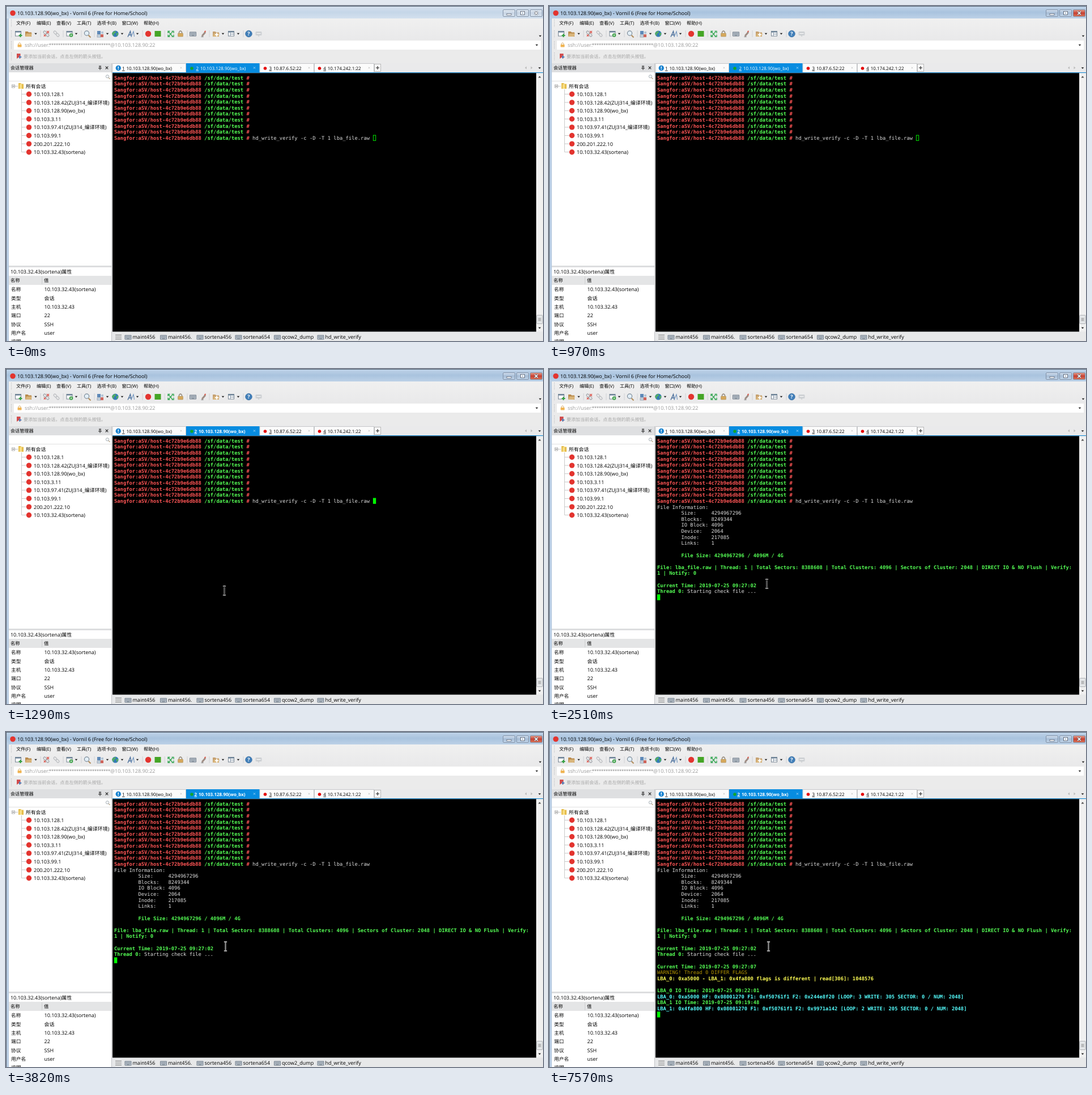
Animation of 948x591 px, one loop 8000 ms. Source, as an HTML page:

```html
<!DOCTYPE html>
<html lang="zh-CN">
<head>
<meta charset="utf-8">
<title>Terminal session</title>
<style>
html, body { margin: 0; width: 100%; height: 100%; overflow: hidden; background: #000; }
svg { display: block; width: 948px; height: 591px; }
text { font-family: 'Open Sans', 'Noto Sans CJK SC', 'Noto Sans CJK', sans-serif; white-space: pre; text-rendering: geometricPrecision; }
.term text { font: 8.824px 'DejaVu Sans Mono', monospace; }
.term .b { font-weight: bold; }
</style>
</head>
<body>
<svg id="stage" viewBox="0 0 948 591" xmlns="http://www.w3.org/2000/svg"></svg>
<script>
const rect = (x, y, w, h, fill, more = '') => `<rect x="${x}" y="${y}" width="${w}" height="${h}" fill="${fill}" ${more}/>`;
const circle = (x, y, r, fill, more = '') => `<circle cx="${x}" cy="${y}" r="${r}" fill="${fill}" ${more}/>`;
const line = (d, stroke, width = 1, more = '') => `<path d="${d}" fill="none" stroke="${stroke}" stroke-width="${width}" ${more}/>`;
const shape = (d, fill, more = '') => `<path d="${d}" fill="${fill}" ${more}/>`;
const label = (x, y, s, size = 9, fill = '#000', more = '') => `<text x="${x}" y="${y}" font-size="${size}" fill="${fill}" ${more}>${s}</text>`;
const group = (id, body, more = '') => `<g id="${id}" ${more}>${body}</g>`;
const caret = (x, y, fill = '#222') => shape(`M${x - 2.3} ${y - 1.2}h4.6l-2.3 2.6z`, fill);
const cross = (x, y, r, color, w = 1) => line(`M${x - r} ${y - r}l${2 * r} ${2 * r}m0 ${-2 * r}l${-2 * r} ${2 * r}`, color, w);
const gradient = (id, ...stops) => `<linearGradient id="${id}" x2="0" y2="1">${stops.map((c, i) =>
  `<stop offset="${i / (stops.length - 1)}" stop-color="${c}"/>`).join('')}</linearGradient>`;

const HOST = '10.103.128.90(wo_bx)';
const RED = '#e3342f';

function captionButtons(close, plain) {
  const box = (x, fill) => rect(x, 6.5, 21, 12, `url(#${fill})`, 'rx="1.5" stroke="#7b8ba0" stroke-width=".9"');
  return box(877.5, plain) + box(901.5, plain) + box(925.5, close) +
    rect(884, 13.5, 8, 2.6, '#fff', 'stroke="#4a5568" stroke-width=".7"') +
    rect(908.5, 9.5, 7, 6, '#fff', 'stroke="#4a5568" stroke-width=".8"') +
    rect(910.7, 11.5, 2.6, 2, '#8fa6bf') + cross(936, 12.5, 2.7, '#4a4f5a', 2.8) + cross(936, 12.5, 2.7, '#fff', 1.6);
}

function titleBar() {
  return rect(0, 0, 948, 591, '#b9cde3') +
    group('idle', rect(0, 0, 948, 22, 'url(#barIdle)') + captionButtons('btnIdle', 'btnIdle')) +
    group('focused', rect(0, 0, 948, 22, 'url(#barFocus)') + captionButtons('btnClose', 'btnFocus')) +
    rect(0, 0, 948, 1, '#52606f') + rect(0, 0, 1, 591, '#59636f') +
    circle(12, 12.5, 4.8, RED) + label(20, 16, `${HOST} - Vornil 6 (Free for Home/School)`);
}

function keyboard(x, y) {
  return rect(x - 6, y - 3.5, 12, 8, '#6f7a87', 'rx="1"') + rect(x - 5, y - 2.5, 10, 6, '#c3ccd6') +
    line(`M${x - 4} ${y - 1}h8m-8 2h8`, '#59646f', 1, 'stroke-dasharray="1.4 .8"') +
    line(`M${x - 2.5} ${y + 2.9}h5`, '#59646f', .8);
}

function folder(x, y, fill) {
  return shape(`M${x - 6} ${y - 4}h4.5l1.5 1.5h5v7.5h-11z`, fill) +
    shape(`M${x - 6} ${y + 5}l2-5.5h10l-2 5.5z`, '#d9b57a');
}

function windowIcon(x, y) {
  return rect(x - 5, y - 4.5, 10, 8.5, '#fff', 'stroke="#667585" stroke-width=".9"') + rect(x - 5, y - 4.5, 10, 2.2, '#71879c');
}

function toolbar() {
  const plus = (x, y, c) => line(`M${x - 3} ${y}h6m-3-3v6`, c, 2);
  const link = (x, c) => `<g transform="rotate(45 ${x} 49)">${rect(x - 6, 47, 6, 4, 'none', `rx="2" stroke="${c}" stroke-width="1.3"`)}${
    rect(x, 47, 6, 4, 'none', `rx="2" stroke="${c}" stroke-width="1.3"`)}</g>`;
  const separators = [61, 101, 133, 156, 241, 280, 320, 359, 419].map(x => line(`M${x} 43v12`, '#c9cbce', .8)).join('');
  return separators + windowIcon(21.5, 49) + plus(25.5, 52, '#35a23f') + folder(40, 49, '#b98a4c') +
    link(71, '#a7abb0') + cross(74, 46, 2, '#dc5148', 1.3) + cross(68.5, 52, 1.7, '#dc5148', 1.2) + link(89, '#bfc1c4') +
    windowIcon(112, 49) + circle(115, 51.5, 3.3, '#49a653') + circle(115, 51.5, 1.1, '#fff') +
    line('M145.5 51.5l4 4', '#b18c5b', 2) + circle(142.5, 48, 4.1, '#e3eff7', 'stroke="#7c8b99" stroke-width="1.2"') +
    rect(161, 44, 6, 6, '#5e89b8') + rect(168, 45, 4, 4, '#b5c5d5') + rect(161, 51, 6, 4, '#c8d4df', 'stroke="#728398" stroke-width=".6"') + rect(167, 50, 5, 5, '#cf655c') +
    circle(193, 49, 5.6, '#337bb8') + shape('M189 46q3-3 5-1l-1 3-3 1 1 4q-4-2-4-5zM195 48l3-1q1 4-3 6z', '#56ad62') +
    line('M215 54.5l4.5-10 2 10m-5-3.5h5', '#4b6f9b', 1.4) + line('M221 54l4-9 1.5 9', '#6c91bd', 1.1) +
    circle(251, 49, 5.2, RED) + rect(262.5, 44, 11, 10, '#45a526') +
    line('M286 48v-3.5h3.5m3 0h3.5v3.5m0 2.5v3.5h-3.5m-3 0h-3.5v-3.5m1-5l7 8m0-8l-7 8', '#35a653', 1.4) +
    line('M305.5 48v-2q2.5-4 5 0v2', '#8d8375', 1.3) + rect(303.5, 48, 9, 6, '#d6a85b', 'rx=".8" stroke="#9b855e" stroke-width=".5"') +
    keyboard(330, 49) + line('M346 53l6-7', '#9f8c83', 3) + line('M350.5 46l2-2', '#d95648', 2) + line('M344.5 54.2h4', '#666', 1) +
    folder(371, 49, '#c6a171') + plus(372, 50.5, '#fff') +
    windowIcon(397.5, 49) + line('M396 46.5v6.5m0-3.5h6', '#74869a', .9) +
    circle(428.5, 49, 5.8, '#417fb9', 'stroke="#2c659b" stroke-width=".7"') +
    label(428.5, 52.3, '?', 9, '#fff', 'text-anchor="middle" font-weight="bold"') +
    rect(440.5, 45, 11, 7, '#ced1d4', 'rx="1.5"') + shape('M444 52l2.5 2.5 1-2.5z', '#ced1d4') + line('M442.5 48.5h7', '#fff', 1) +
    [52.5, 124, 179, 205, 232, 383, 410].map(x => caret(x, 49)).join('') + caret(943, 53);
}

function header() {
  const menus = [[18, '文件(F)'], [54, '编辑(E)'], [89, '查看(V)'], [125, '工具(T)'], [160.5, '选项卡(B)'], [204.5, '窗口(W)'], [243, '帮助(H)']];
  const grip = (y, h) => line(`M9.5 ${y}v${h}`, '#b5b7ba', 1.2, 'stroke-dasharray="1 1.5"');
  return rect(5, 22, 943, 569, '#ebebeb') + rect(5, 22, 943, 38, 'url(#panel)') +
    menus.map(([x, s]) => label(x, 32.7, s, 8.1)).join('') + toolbar() +
    grip(24, 13) + grip(43, 13) + grip(62, 14) + grip(82, 14) +
    rect(14, 61, 930, 16, '#fff') + line('M21.8 68v-1.6q2.1-3 4.2 0v1.6', '#d7a85d', 1) + rect(20.5, 68, 7, 4.5, '#f0b452', 'rx=".7"') +
    label(33, 72.4, 'ssh://user:', 9, '#999') +
    label(76, 72.4, '*'.repeat(27), 9.3, '#999', 'style="font-family:Roboto,sans-serif"') +
    label(184, 72.4, '@10.103.128.90:22', 9, '#999') + caret(937, 69) +
    shape('M19 84h6.5v9l-3.2-2.5-3.3 2.5z', '#d24b4b') + shape('M23 87l5 3-5 3z', '#5481b9') +
    label(31, 91.8, '要添加当前会话，点击左侧的箭头按钮。', 8.05, '#a5a5a5');
}

function sidebar() {
  const sessions = ['10.103.128.1', '10.103.128.42(ZUJ314_编译环境)', HOST, '10.103.3.11',
    '10.103.97.41(ZUJ314_编译环境)', '10.103.99.1', '200.201.222.10', '10.103.32.43(sortena)'];
  const properties = [['名称', '10.103.32.43(sortena)'], ['类型', '会话'], ['主机', '10.103.32.43'],
    ['端口', '22'], ['协议', 'SSH'], ['用户名', 'user'], ['说明', '']];
  const tree = sessions.map((s, i) => {
    const y = 155.5 + 14.6 * i;
    return line(`M27.5 ${y}h8`, '#bbb', .8) + circle(40.5, y, 4.7, RED) + label(49, y + 3.4, s);
  }).join('');
  const rows = properties.map(([key, value], i) => {
    const y = 503.3 + 15.35 * i;
    return label(9, y, key, 8.7) + label(67.5, y, value);
  }).join('');
  return rect(5, 101, 181, 16, '#dedfe1') + label(8, 111.6, '会话管理器', 8.1) +
    line('M164 106h4m-3 0v4m2 0v-4m-4 4h6m-3 0v3', '#222', .9) + cross(178, 109, 2.3, '#222', 1.1) +
    rect(5, 117, 181, 15, '#fff') + line('M5 132.5h181', '#ddd', .8) +
    circle(179, 124.3, 2.6, '#fff', 'stroke="#98a2aa" stroke-width=".9"') + line('M181 126.4l2.5 2.5', '#ad9a7c', 1.2) +
    rect(5, 133, 181, 325, '#fff') + line('M27.5 147v110.7', '#bbb', .8) + line('M16 141.5h5', '#bbb', .8) +
    rect(10.5, 139, 5, 5, '#fff', 'stroke="#999" stroke-width=".8"') + line('M11.5 141.5h3', '#444', .8) +
    shape('M22 136h4l1 1.5h4v8.5h-9z', '#e5bd4c') + shape('M24 138.5l4-2v9.5h-4z', '#f7dc83') + label(35, 144.5, '所有会话', 8.8) + tree +
    rect(5, 458, 181, 3, '#dcdddf') + rect(5, 461, 181, 130, '#fff') + label(8, 471.5, '10.103.32.43(sortena)属性', 8.95) +
    rect(5, 476, 181, 16, '#e4e5e6') + line('M63.5 477v14', '#c7c8ca', .8) +
    label(8, 487, '名称', 8.3) + label(67, 487, '值', 8.3) + rows + line('M186.5 101v490', '#c2c4c7', 1);
}

function tabs() {
  const underlined = n => `<tspan text-decoration="underline">${n}</tspan>`;
  const tab = (x, w, fill) => rect(x, 101.5, w, 16, fill, 'stroke="#bcbec1" stroke-width=".8"');
  const caption = (x, n, s, fill, weight = '') => label(x, 112.8, underlined(n), 8, fill, weight) + label(x + 7.5, 112.8, s, 8, fill, weight);
  const bold = 'font-weight="bold"';
  return rect(188, 100, 760, 18, '#eaeaeb') + tab(188, 129.5, '#fbfbfb') + tab(448, 95.5, '#fbfbfb') + tab(544.5, 105, '#fbfbfb') +
    rect(318, 101, 129.5, 17, '#078ce0') + rect(188, 117, 760, 1.3, '#1689d2') +
    circle(198.3, 109.5, 4.7, '#1782d0') + rect(197.6, 106.5, 1.4, 3.7, '#fff') + rect(197.6, 111, 1.4, 1.4, '#fff') +
    caption(205, 1, HOST, '#000') + circle(328, 110, 2.8, '#12a52c') +
    group('tabIdle', caption(335.5, 2, HOST, '#fff')) + group('tabFocused', caption(332.5, 2, HOST, '#fff', bold)) +
    circle(457.5, 110, 2.8, '#e50707') + caption(464.5, 3, '10.87.6.52:22', '#000') +
    circle(553.5, 110, 2.8, '#e50707') + caption(560.3, 4, '10.174.242.1:22', '#000') +
    cross(309, 109, 1.5, '#c8c8c8', .8) + cross(438.5, 109, 1.6, '#a5d5f5', .9) + cross(535, 109, 1.5, '#c8c8c8', .8) + cross(641, 109, 1.5, '#c8c8c8', .8) +
    rect(650.5, 102.5, 11, 13, '#f8f8f8', 'stroke="#aaa" stroke-width=".8"') + line('M653 109h6m-3-3v6', '#222', 1.1) +
    shape('M919 106.5v5l-3-2.5zM926.5 106.5v5l3-2.5z', '#bbb') + caret(942, 109.5);
}

function frameBars() {
  const buttons = [[210, 'maint456'], [272.5, 'maint456.'], [337, 'sortena456'], [405, 'sortena654'], [473.5, 'qcow2_dump'], [550, 'hd_write_verify']];
  return rect(936, 118.3, 12, 456, '#f0f0f0') + shape('M939.5 126.5h5l-2.5-3z', '#444') + caret(942, 568) +
    rect(936.8, 545.5, 10.4, 15, '#e5e7e9', 'rx="1" stroke="#a2a5a9" stroke-width=".8"') + line('M939.5 551h5m-5 2h5m-5 2h5', '#777', .8) +
    rect(187, 574.5, 761, 17, '#e7e8e9') + line('M193 580.5h11m-11 3.5h11m-11 3.5h11', '#777', 1) +
    buttons.map(([x, s]) => keyboard(x + 5.5, 584) + label(x + 13.5, 587.2, s)).join('');
}

const CHAR = 5.3125, ROW = 10.625, LEFT = 191, TOP = 121.3;
const COLORS = { R: '#ff5555', G: '#55ff55', W: '#dedede', O: '#b39400', Y: '#ffff55', C: '#55ffff' };

// Each run is a colour letter followed by its text; white and ochre are regular weight.
function terminalRow(row, ...runs) {
  const spans = runs.map(run => `<tspan fill="${COLORS[run[0]]}" class="${'WO'.includes(run[0]) ? '' : 'b'}">${run.slice(1).replace('&', '&amp;')}</tspan>`);
  return `<text x="${LEFT}" y="${TOP + 8.4 + ROW * row}">${spans.join('')}</text>`;
}

function terminal() {
  const prompt = ['RSangfor:aSV/host-4c72b9e6db88 ', 'G/sf/data/test ', 'R#'];
  const prompts = Array.from({ length: 11 }, (_, i) => terminalRow(i, ...prompt, i === 10 ? 'W hd_write_verify -c -D -T 1 lba_file.raw' : 'W')).join('');
  const info = [['Size', 4294967296], ['Blocks', 8249344], ['IO Block', 4096], ['Device', 2064], ['Inode', 217085], ['Links', 1]];
  const started = terminalRow(11, 'WFile Information:') +
    info.map(([k, v], i) => terminalRow(12 + i, 'W' + ' '.repeat(8) + (k + ':').padEnd(10) + v)).join('') +
    terminalRow(19, 'G        File Size: 4294967296 / 4096M / 4G') +
    terminalRow(21, 'GFile: lba_file.raw | Thread: 1 | Total Sectors: 8388608 | Total Clusters: 4096 | Sectors of Cluster: 2048 | DIRECT IO & NO Flush | Verify:') +
    terminalRow(22, 'G1 | Notify: 0') + terminalRow(24, 'GCurrent Time: 2019-07-25 09:27:02') +
    terminalRow(25, 'GThread 0:', 'W Starting check file ...');
  const warned = terminalRow(27, 'GCurrent Time: 2019-07-25 09:27:07') + terminalRow(28, 'OWARNING! Thread 0 DIFFER FLAGS') +
    terminalRow(29, 'YLBA_0: 0xa5000 - LBA_1: 0x4fa800 flags is different | read[306]: 1048576') +
    terminalRow(31, 'GLBA_0 IO Time: 2019-07-25 09:22:01') +
    terminalRow(32, 'CLBA_0: 0xa5000 HF: 0x08001270 F1: 0xf50761f1 F2: 0x244e8f20 [LOOP: 3 WRITE: 305 SECTOR: 0 / NUM: 2048]') +
    terminalRow(33, 'GLBA_1 IO Time: 2019-07-25 09:19:48') +
    terminalRow(34, 'CLBA_1: 0x4fa800 HF: 0x08001270 F1: 0xf50761f1 F2: 0x9971a142 [LOOP: 2 WRITE: 205 SECTOR: 0 / NUM: 2048]');
  return rect(188, 118.3, 748, 456.2, '#000') +
    group('screen', prompts + group('started', started) + group('warned', warned), 'class="term"') +
    rect(0, 0, CHAR, ROW - .3, '#00ff00', 'id="block"') +
    rect(LEFT + CHAR * 86 + .5, TOP + ROW * 10 + .5, CHAR - 1, ROW - 1.3, 'none', 'id="hollow" stroke="#00e800" stroke-width="1"');
}

function pointer() {
  const d = 'M-2.6 -8h1.8l.8 .7 .8-.7h1.8M0 -7.3v14.6M-2.6 8h1.8l.8-.7 .8 .7h1.8';
  return group('pointer', line(d, '#d8d8d8', 2) + line(d, '#000', .8, 'id="core"'));
}

const stage = document.getElementById('stage');
stage.innerHTML = `<defs>${gradient('barIdle', '#d6e1ee', '#c5d6e8', '#d3e0ee')}${gradient('barFocus', '#c1d4e9', '#a9c3de', '#bcd1e7')}${
  gradient('btnIdle', '#e1e9f2', '#c8d5e4', '#d8e3ef')}${gradient('btnFocus', '#d3e0ef', '#a7bdd6', '#c3d6ea')}${
  gradient('btnClose', '#e5a18f', '#c84032', '#d8775c')}${gradient('panel', '#f0f0f0', '#e9e9ea')}</defs>` +
  titleBar() + header() + sidebar() + tabs() + frameBars() + terminal() + pointer();

const part = id => document.getElementById(id);
const show = (id, on) => part(id).setAttribute('visibility', on ? 'visible' : 'hidden');
const pointerStops = [[1140, 351.5, 465], [1290, 385.5, 391], [1430, 392.5, 378.8], [1830, 384.5, 379], [3820, 387.5, 378.3]];

function update(t) {
  show('idle', t < 970);
  show('focused', t >= 970);
  const focused = t >= 1140;
  show('tabIdle', !focused);
  show('tabFocused', focused);
  show('hollow', !focused);
  show('block', focused);
  show('started', t >= 2510);
  show('warned', t >= 7570);
  const [col, row] = t < 2510 ? [86, 10] : t < 7570 ? [0, 26] : [0, 35];
  part('block').setAttribute('transform', `translate(${LEFT + CHAR * col} ${TOP + ROW * row})`);
  const stop = pointerStops.filter(s => s[0] <= t).pop();
  show('pointer', stop);
  if (stop) part('pointer').setAttribute('transform', `translate(${stop[1]} ${stop[2]})`);
  part('core').setAttribute('stroke', t < 3820 ? '#000' : '#666');
}

const start = performance.now();
function tick() {
  update((performance.now() - start) % 8000);
  requestAnimationFrame(tick);
}
tick();
</script>
</body>
</html>
```
